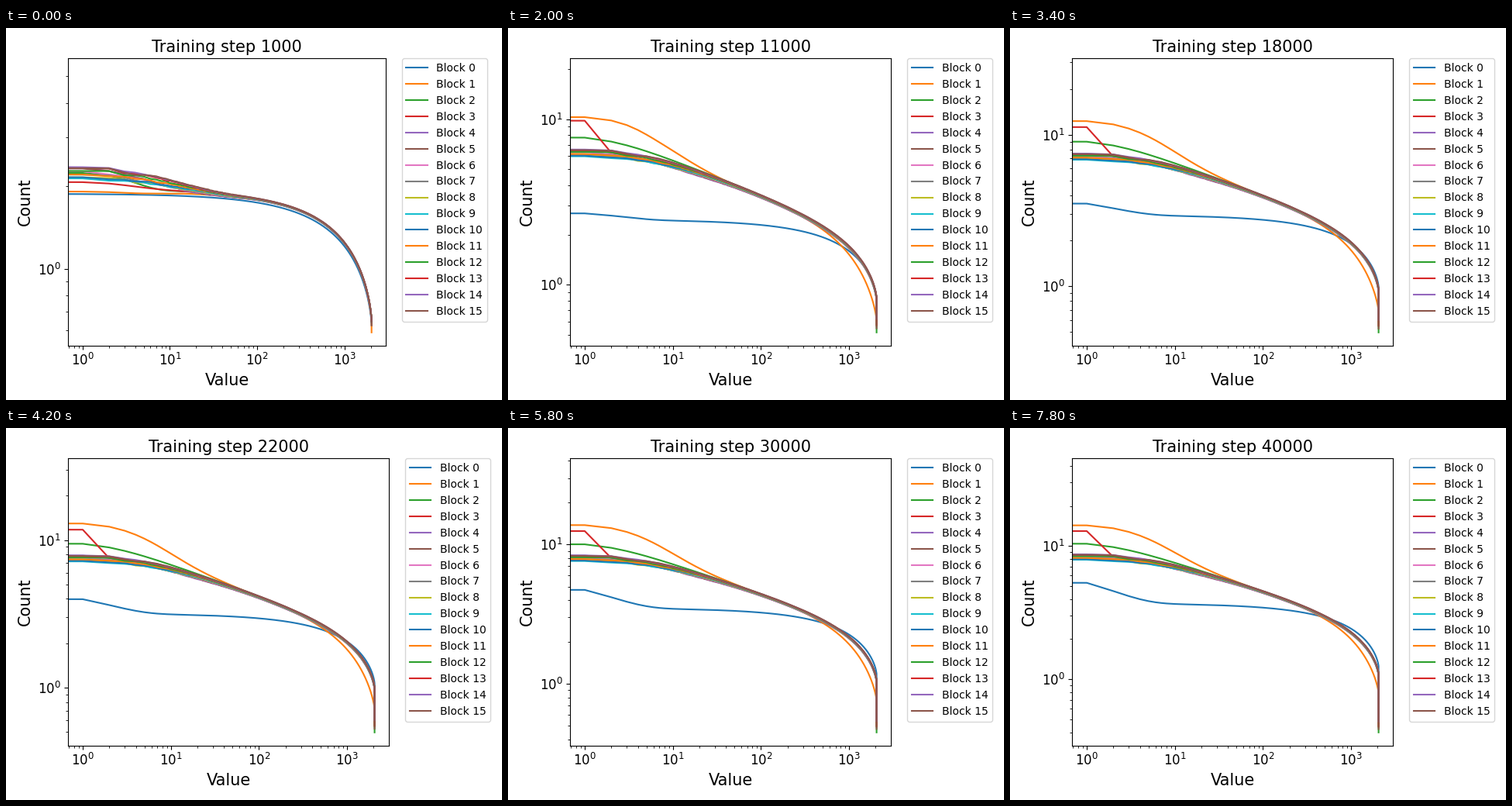
Write a matplotlib script that moves like this. It is 640x480 px and loops after 8 s.

```python
import numpy as np
import matplotlib.pyplot as plt
from matplotlib.animation import FuncAnimation
from matplotlib.ticker import NullFormatter

W, H, DPI = 640, 480, 100
FRAMES, INTERVAL = 40, 200
BLOCKS, N = 16, 2048

plt.rcParams["font.family"] = "DejaVu Sans"


def smoothstep(x):
    x = np.clip(x, 0, 1)
    return x * x * (3 - 2 * x)


def bell(x, centre, width):
    return np.exp(-((x - centre) / width) ** 2)


def settle(step, scale):
    """Growth from 0 at step 1 towards 1."""
    return 1 - np.exp(-(step - 1) / scale)


def random_spectrum(n, a=0.5, b=1.5):
    """Sorted log10 singular values of a random 1:4 matrix, largest at 0."""
    s = (a + b) / 2 - (b - a) / 2 * np.cos(np.linspace(0, np.pi, 6001))
    dens = np.sqrt(np.maximum((b * b - s * s) * (s * s - a * a), 0)) / s
    cdf = np.concatenate([[0], np.cumsum((dens[1:] + dens[:-1]) / 2 * np.diff(s))])
    q = 1 - (np.arange(n) + 0.5) / n
    return np.log10(np.interp(q, cdf / cdf[-1], s) / b)


x = np.maximum(np.arange(N, dtype=float), 1)
u = np.log10(x)
rank = x.copy()
rank[0] = 0.1                      # lies left of the visible range
spectrum = random_spectrum(N)

plateau = 1 / (1 + (x / 4.3) ** 4)
knee = 1 / (1 + (x / 9) ** 1.6)
decay = np.exp(-(x - 1) / 2)

rng = np.random.default_rng(4)
jitter = rng.normal(0, .006, (BLOCKS, N)) / x ** .7
jitter[:, :2] = 0
gaps = rng.uniform(.03, .1, BLOCKS)
gaps[-1] = .025


def limits(step):
    top = .763 + .311 * settle(step, 1) + .614 * settle(step, 12) ** 1.3
    bottom = np.interp(step, [1, 5, 11, 15, 22, 30, 40],
                       [-.278, -.284, -.367, -.388, -.391, -.442, -.497])
    return bottom, top


def curves(step, low):
    """Log10 values of every block; low is the smallest value of all."""
    fast, rise, slow = (settle(step, s) for s in (1, 3.8, 12))
    burst = 1.5 * fast * bell(step, 1, 6)
    common = (.35 + .274 * fast + .307 * slow + spectrum
              - (.065 + .365 * fast) * smoothstep(u / (1.8 + 2 * fast)))
    lead = 1 if step < 3 else 14 if step < 8 else 12
    out = []
    for k in range(BLOCKS):
        if k == 0:
            y = (.273 + .318 * slow ** 1.7 + spectrum
                 + .08 * burst * plateau + .175 * slow ** 3 * decay)
        elif k == 1:
            head = knee + (plateau - knee) * min(burst, 1)
            y = (common + (.315 * rise - .07) * head
                 - .055 * burst * bell(u, 1.65, .5) - .14 * rise * (x / N) ** 1.5)
        elif k == 2:
            y = (common + .1 * rise / (1 + (x - 1) / 5)
                 - .025 * (1 - fast) * bell(u, .85, .4))
        elif k == 3:
            y = (common + .195 * fast * np.exp(-3 * (x - 1))
                 - .034 * (1 - fast) / (1 + (x / 12) ** 2))
        else:
            head = .02 * np.cos(2 * np.pi * (k - 4) / 10)
            trend = (k - 9.5) / 5.5
            y = (common + jitter[k] + head * (1 - smoothstep(u / 1.5))
                 + (.012 + .01 * burst) * trend * bell(u, 1, .6)
                 + .008 * (.3 + .6 * fast + .8 * burst) * trend * smoothstep(u / 2))
        y = np.minimum.accumulate(y)
        y[-1] = min(y[-1], low + (0 if k == lead else gaps[k]))
        out.append(y)
    return out


fig, ax = plt.subplots(figsize=(W / DPI, H / DPI), dpi=DPI)
ax.set_xscale("log")
ax.set_yscale("log")
margin = .05 * np.log10(N - 1)
ax.set_xlim(10 ** -margin, (N - 1) * 10 ** margin)
ax.xaxis.set_minor_formatter(NullFormatter())
ax.yaxis.set_minor_formatter(NullFormatter())
ax.tick_params(labelsize=12)
ax.set_xlabel("Value", fontsize=15)
ax.set_ylabel("Count", fontsize=15)
title = ax.set_title("", fontsize=15)
lines = [ax.plot(rank, np.ones(N), color=f"C{k % 10}", label=f"Block {k}")[0]
         for k in range(BLOCKS)]
ax.legend(bbox_to_anchor=(1.05, 1), loc="upper left", borderaxespad=0, fontsize=10)


def show_step(step):
    bottom, top = limits(step)
    low = bottom + (top - bottom) / 22
    for line, y in zip(lines, curves(step, low)):
        line.set_ydata(10 ** y)
    ax.set_ylim(10 ** bottom, 10 ** top)
    title.set_text(f"Training step {step * 1000}")


# The legend scales with the axes, so the layout settles over a few passes.
show_step(1)
layouts = []
for _ in range(4):
    fig.tight_layout()
    layouts.append(ax.get_position().frozen())


def draw(frame):
    show_step(frame + 1)
    ax.set_position(layouts[min(frame, len(layouts) - 1)])
    return lines + [title]


anim = FuncAnimation(fig, draw, frames=FRAMES, interval=INTERVAL,
                     repeat=True, repeat_delay=0, blit=False)
plt.show()
```
